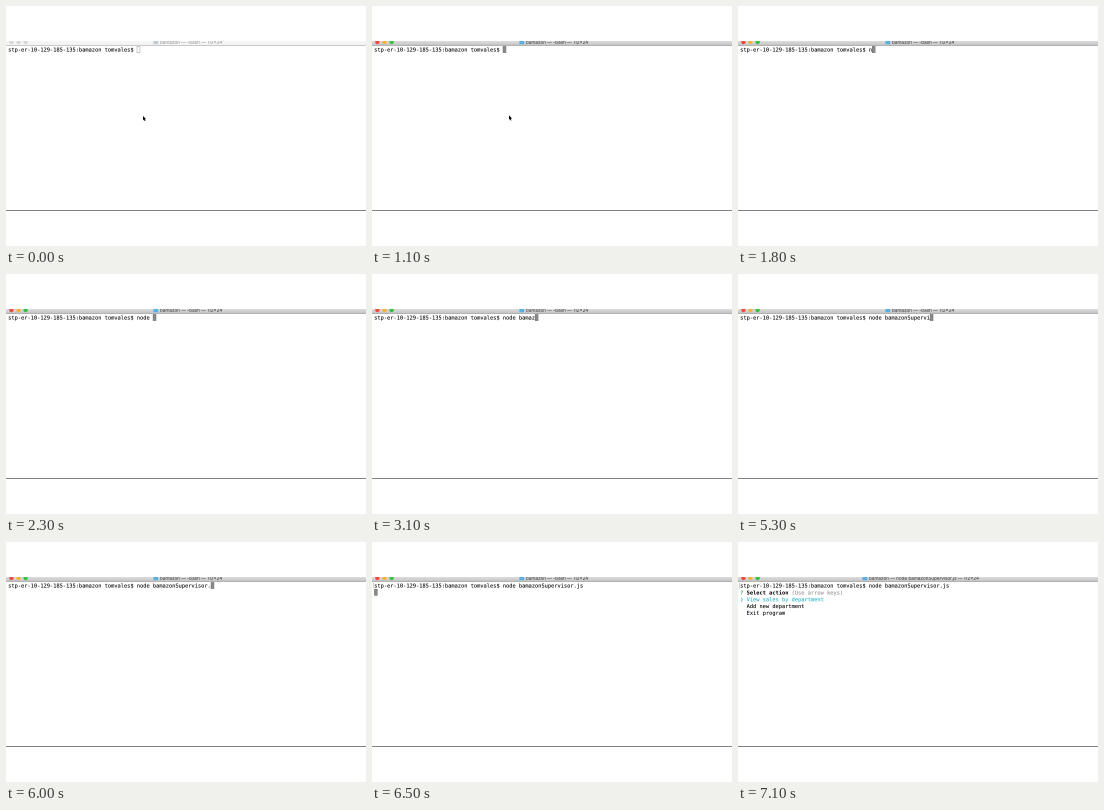
Recreate the animation shown at these times as an HTML page with a canvas. Size 360x240 px, loop 8 s.

```html
<!DOCTYPE html>
<html lang="en">
<head>
<meta charset="utf-8">
<title>Terminal session</title>
<style>
html, body { margin: 0; width: 100%; height: 100%; overflow: hidden; background: #fff; }
canvas { display: block; width: 360px; height: 240px; }
</style>
</head>
<body>
<canvas id="stage" width="360" height="240"></canvas>
<script>
const W = 360, H = 240, LOOP = 8000, SCALE = 4;
const CELL = 3.216, LEFT = 2.2, ROW = 6.78, BASE = 45.6;
const MONO = '"DejaVu Sans Mono", "Liberation Mono", monospace';
const PROMPT = 'stp-er-10-129-185-135:bamazon tomvales$ ';

// [time, command line so far]
const TYPED = [
  [1800, 'n'], [1900, 'no'], [2000, 'nod'], [2100, 'node'], [2300, 'node '],
  [2600, 'node b'], [2700, 'node ba'], [2800, 'node bam'], [2900, 'node bama'],
  [3100, 'node bamaz'], [3200, 'node bamazo'], [3300, 'node bamazon'],
  [3600, 'node bamazons'], [4000, 'node bamazon'], [4500, 'node bamazonS'],
  [4700, 'node bamazonSu'], [4800, 'node bamazonSup'], [4900, 'node bamazonSupe'],
  [5100, 'node bamazonSuper'], [5300, 'node bamazonSupervi'], [5400, 'node bamazonSupervis'],
  [5600, 'node bamazonSuperviso'], [5700, 'node bamazonSupervisor'],
  [6000, 'node bamazonSupervisor.'], [6100, 'node bamazonSupervisor.j'],
  [6300, 'node bamazonSupervisor.js']
];
const FOCUS = 1100, HIDE_MOUSE = 1800, ENTER = 6500, RUN = 6600, MENU = 7000;

const view = document.getElementById('stage').getContext('2d');
const layer = document.createElement('canvas');
layer.width = W * SCALE;
layer.height = H * SCALE;
const ctx = layer.getContext('2d');

function rect(x, y, w, h, color) {
  ctx.fillStyle = color;
  ctx.fillRect(x, y, w, h);
}

function disc(x, y, r, color) {
  ctx.fillStyle = color;
  ctx.beginPath();
  ctx.arc(x, y, r, 0, Math.PI * 2);
  ctx.fill();
}

function print(text, col, row, color = '#000', bold = false) {
  ctx.font = (bold ? 'bold ' : '') + '5.3px ' + MONO;
  ctx.fillStyle = ctx.strokeStyle = color;
  ctx.lineWidth = 0.07;
  [...text].forEach((ch, i) => {
    const x = LEFT + (col + i) * CELL, y = BASE + row * ROW;
    ctx.fillText(ch, x, y);
    if (!bold) ctx.strokeText(ch, x, y);
  });
}

function titleBar(active, running) {
  ctx.save();
  ctx.beginPath();
  ctx.rect(0, 35, W, 5);
  ctx.clip();
  const shade = ctx.createLinearGradient(0, 35, 0, 39);
  shade.addColorStop(0, active ? '#dedede' : '#f6f6f6');
  shade.addColorStop(1, active ? '#c6c6c6' : '#f4f4f4');
  rect(0, 35, W, 5, shade);
  rect(0, 39, W, 1, active ? '#b2b2b2' : '#c8c8c8');
  const lights = active ? ['#f04a44', '#f3b236', '#35c044'] : ['#d6d6d6', '#d6d6d6', '#d6d6d6'];
  lights.forEach((c, i) => disc(5.4 + i * 7.1, 36, 2.2, c));

  const x = running ? 131 : 154;
  rect(x - 6.6, 35, 4.8, 3.2, active ? '#58b0e0' : '#c3cbd0');
  ctx.font = '4.6px Inter, "Open Sans", sans-serif';
  ctx.fillStyle = active ? '#2a2a2a' : '#8c8c8c';
  ctx.fillText('bamazon — ' + (running ? 'node bamazonSupervisor.js' : '-bash') + ' — 112×24', x, 37.8);
  ctx.restore();
}

function caret(col, row, active) {
  const x = LEFT + col * CELL, y = 40.2 + row * ROW;
  if (active) rect(x, y, CELL, 6.6, '#8a8a8a');
  ctx.strokeStyle = active ? '#707070' : '#999';
  ctx.lineWidth = 0.5;
  ctx.strokeRect(x + 0.2, y + 0.2, CELL - 0.3, 6.2);
}

function mouse(t) {
  const move = Math.min(1, Math.max(0, (t - 1000) / 300));
  ctx.save();
  ctx.translate(137, 110 - 1.8 * move);
  ctx.scale(0.88, 0.88);
  ctx.beginPath();
  ctx.moveTo(0, 0);
  for (const [x, y] of [[0, 5], [1.1, 4], [1.9, 5.9], [2.8, 5.5], [2, 3.7], [3.5, 3.6]]) ctx.lineTo(x, y);
  ctx.closePath();
  ctx.strokeStyle = '#fff';
  ctx.lineWidth = 0.8;
  ctx.stroke();
  ctx.fillStyle = '#000';
  ctx.fill();
  ctx.restore();
}

function menu() {
  print('?', 0, 1, '#3aa655', true);
  print('Select action', 2, 1, '#000', true);
  print('(Use arrow keys)', 16, 1, '#8e8e8e');
  print('❯', 0, 2, '#2fb4c6', true);
  print('View sales by department', 2, 2, '#20b2c8');
  print('Add new department', 2, 3);
  print('Exit program', 2, 4);
}

function draw(t) {
  const active = t >= FOCUS;
  let command = '';
  for (const [at, text] of TYPED) if (t >= at) command = text;

  ctx.setTransform(SCALE, 0, 0, SCALE, 0, 0);
  rect(0, 0, W, H, '#fff');
  titleBar(active, t >= RUN);
  rect(0, 204, W, 1, '#828282');

  if (t < ENTER) caret(PROMPT.length + command.length, 0, active);
  else if (t < MENU) caret(0, 1, true);
  print(PROMPT + command, 0, 0);
  if (t >= ENTER) {
    rect(1, 41, 0.5, 5.2, '#aaa');
    rect(1, 41, 1, 0.5, '#aaa');
    rect(1, 45.7, 1, 0.5, '#aaa');
  }
  if (t >= MENU) menu();
  if (t < HIDE_MOUSE) mouse(t);

  view.imageSmoothingQuality = 'high';
  view.drawImage(layer, 0, 0, W, H);
}

const start = performance.now();
function tick() {
  draw((performance.now() - start) % LOOP);
  requestAnimationFrame(tick);
}
tick();
</script>
</body>
</html>
```
